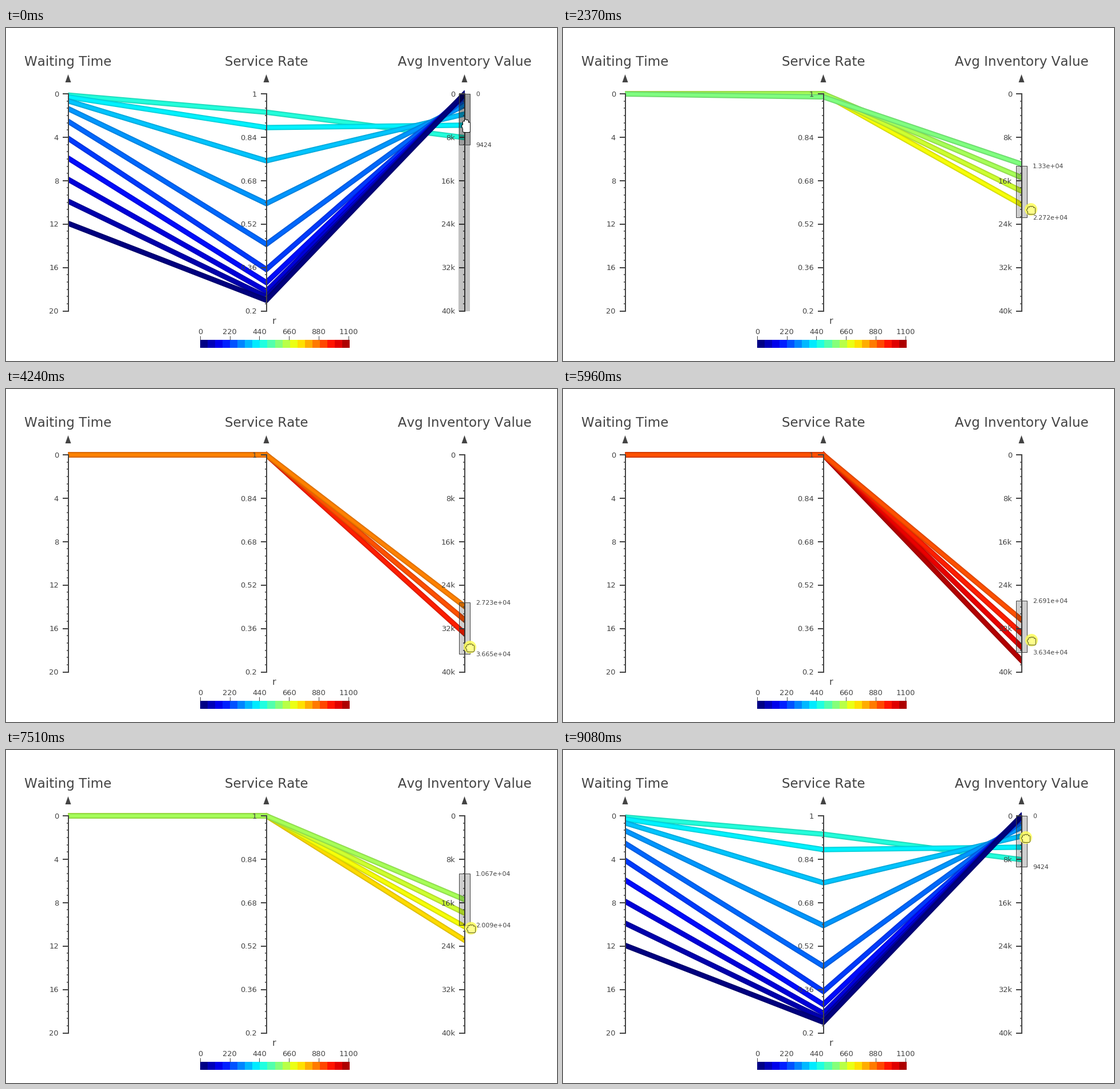
Write a matplotlib script that moves like this. It is 962 px wide and 582 px high and loops after 9690 ms.

```python
import matplotlib.pyplot as plt
import numpy as np
from matplotlib.animation import FuncAnimation
from matplotlib.collections import LineCollection, PolyCollection
from matplotlib.patches import Circle, Polygon, Rectangle

W, H, DPI = 962, 582, 64
PT = 72 / DPI                     # points per pixel
LOOP, INTERVAL = 9690, 30
INK = "#444444"
TOP, BOTTOM = 115, 494.5
AXES_X = (108.5, 454.5, 800.5)
V_MAX, V_SPAN = 40000, 9424

plt.rcParams.update({"font.family": "DejaVu Sans", "text.kerning_factor": 6})
fig = plt.figure(figsize=(W / DPI, H / DPI), dpi=DPI, facecolor="white")
ax = fig.add_axes([0, 0, 1, 1])
ax.set_xlim(0, W)
ax.set_ylim(H, 0)
ax.axis("off")


def jet(t):
    return np.clip(1.5 - np.abs(4 * t - np.array([3, 2, 1])), 0, 1)


def label(x, y, text, size, ha="center", z=4):
    return ax.text(x, y, text, fontsize=size * PT, ha=ha, va="baseline",
                   color=INK, zorder=z)


def strokes(segments, width, color=INK, z=3, cap="butt"):
    lines = LineCollection(segments, colors=color, linewidths=width * PT,
                           capstyle=cap, zorder=z)
    return ax.add_collection(lines)


def value_y(v):
    return TOP + v / V_MAX * (BOTTOM - TOP)


# Axes
def draw_axis(x, title, first, last, fmt="{:g}"):
    label(x, 66, title, 23)
    ax.add_patch(Polygon([(x, 81), (x - 5, 95), (x + 5, 95)], color=INK, lw=0, zorder=3))
    major = np.linspace(TOP, BOTTOM, 6)
    strokes([[(x, TOP - 1), (x, BOTTOM + 1)]], 2)
    strokes([[(x - 10, y), (x, y)] for y in major], 2)
    strokes([[(x - 3, y), (x, y)] for y in np.linspace(TOP, BOTTOM, 31)], 1.5)
    for y, v in zip(major, np.linspace(first, last, 6)):
        label(x - 16.5, y + 4.7, fmt.format(v) if v else "0", 13, "right")


draw_axis(AXES_X[0], "Waiting Time", 0, 20)
draw_axis(AXES_X[1], "Service Rate", 1, 0.2)
draw_axis(AXES_X[2], "Avg Inventory Value", 0, 40, "{:g}k")

# Colour bar
label(468, 517, "r", 16)
for k in range(20):
    ax.add_patch(Rectangle((339 + 13.05 * k, 544.5), 13.05, 14.5, lw=0,
                           color=jet(.005 + .05 * k), antialiased=False))
for k in range(6):
    x = 338.8 + 51.8 * k
    label(x, 535, str(220 * k), 13)
    strokes([[(x, 538), (x, 545)]], 1)


# Data: one line per r, as pixel heights on the three axes
def soft_ramp(x, slope, s=1.1):
    return slope * s * np.log1p(np.exp(x / s))


N = 22
r = np.arange(N)
wait = TOP + soft_ramp(5.8 - r, 39)
logit = .52 * (6.16 - r) + .29 * np.clip(6.16 - r, -2, 1.7)
rate = TOP + np.maximum(0, 381 / (1 + np.exp(-logit)) - 11)
stock = TOP + soft_ramp(r - 5.83, 23.7)
tint = r / N + .025 * np.minimum(0, np.sin(2 * np.pi * r / N))


def tube(i):
    """Shaded strips for both halves of one line, cut upright at the axes."""
    ys = (wait[i], rate[i], stock[i])
    polys, colors = [], []
    for half, shade in ((4.6, .83), (3.6, .92), (2.2, 1)):
        for a in (0, 1):
            x0, x1, y0, y1 = AXES_X[a], AXES_X[a + 1], ys[a], ys[a + 1]
            h = half * np.hypot(1, (y1 - y0) / (x1 - x0))
            polys.append([(x0, y0 - h), (x1, y1 - h), (x1, y1 + h), (x0, y0 + h)])
            colors.append(jet(tint[i]) * shade)
    return polys, colors


tubes = [tube(i) for i in range(N)]
lines = PolyCollection([], linewidths=0, zorder=2)
ax.add_collection(lines)

# Brush on the right axis
track = Rectangle((790, TOP), 20, BOTTOM - TOP, fc=(0, 0, 0, .24), lw=0, zorder=5)
brush = Rectangle((790.5, TOP), 19, 1, fc=(0, 0, 0, .19), ec=INK, lw=PT, zorder=6)
ax.add_patch(track)
ax.add_patch(brush)
low_label = label(820, 0, "", 11, "left", 6)
high_label = label(820, 0, "", 11, "left", 6)

# Cursor: a hand of round strokes, dark below light
halo = Circle((0, 0), 11, fc=(1, 1, .35, .85), lw=0, zorder=7)
ax.add_patch(halo)
hand_edge = strokes([], 5, z=8, cap="round")
hand_fill = strokes([], 3, z=9, cap="round")


def hand(reach, palm):
    fingers = [[(x, palm), (x, -reach * (1 - .08 * (x - .4) ** 2 / 4))]
               for x in np.linspace(-3.6, 5.4, 4)]
    base = [[(-2, palm), (4, palm)], [(-5.5, 1), (-2, palm)]]
    return np.array(fingers + base)


OPEN, FIST = hand(9, 10), hand(4.5, 5.5)

# Timing: even steps, with one pause at the far end
START, STEP, PAUSE = 320, 156.4, 31
LAG = 1.5                         # line filtering trails the brush, in steps

# step, brush low value, cursor x, cursor y
KEYS = np.array([
    (0, 0, 803, 170), (13, 13300, 817, 317), (25, 27230, 810, 451), (28, 30576, 812, 496),
    (33, 30576, 814, 502), (36, 26912, 818, 439), (40.5, 20650, 814, 398),
    (42, 19900, 813, 386), (48.5, 4900, 811, 265), (50, 2408, 810, 237),
    (54, 0, 809, 181), (56, 0, 808, 153)])


def key(step, column):
    return np.interp(step, KEYS[:, 0], KEYS[:, column])


def update(n):
    step = int((n * INTERVAL + 20 - START) // STEP)
    if step == PAUSE:
        step -= 1
    held = step >= 0

    low = key(step, 1)
    y0, y1 = value_y(low), value_y(low + V_SPAN)
    brush.set_y(y0)
    brush.set_height(y1 - y0)
    for text, v, y in ((low_label, low, y0), (high_label, low + V_SPAN, y1)):
        text.set_text(f"{v:.4g}")
        text.set_y(y + 4)
    track.set_visible(not held)

    seen = key(step - LAG, 1)
    first, last = value_y(seen), value_y(seen + V_SPAN)
    shown = [tubes[i] for i in reversed(range(N)) if first <= stock[i] <= last]
    lines.set_verts([p for polys, _ in shown for p in polys])
    lines.set_facecolor([c for _, colors in shown for c in colors])

    spot = np.array([key(step, 2), key(step, 3)])
    halo.set_visible(held)
    halo.center = tuple(spot)
    for part in (hand_edge, hand_fill):
        part.set_segments((FIST if held else OPEN) + spot)
    hand_edge.set_color("#5c5c1c" if held else "black")
    hand_fill.set_color("#ffff8c" if held else "white")
    return ()


anim = FuncAnimation(fig, update, frames=LOOP // INTERVAL, interval=INTERVAL,
                     repeat=True, repeat_delay=0, cache_frame_data=False)
plt.show()
```
